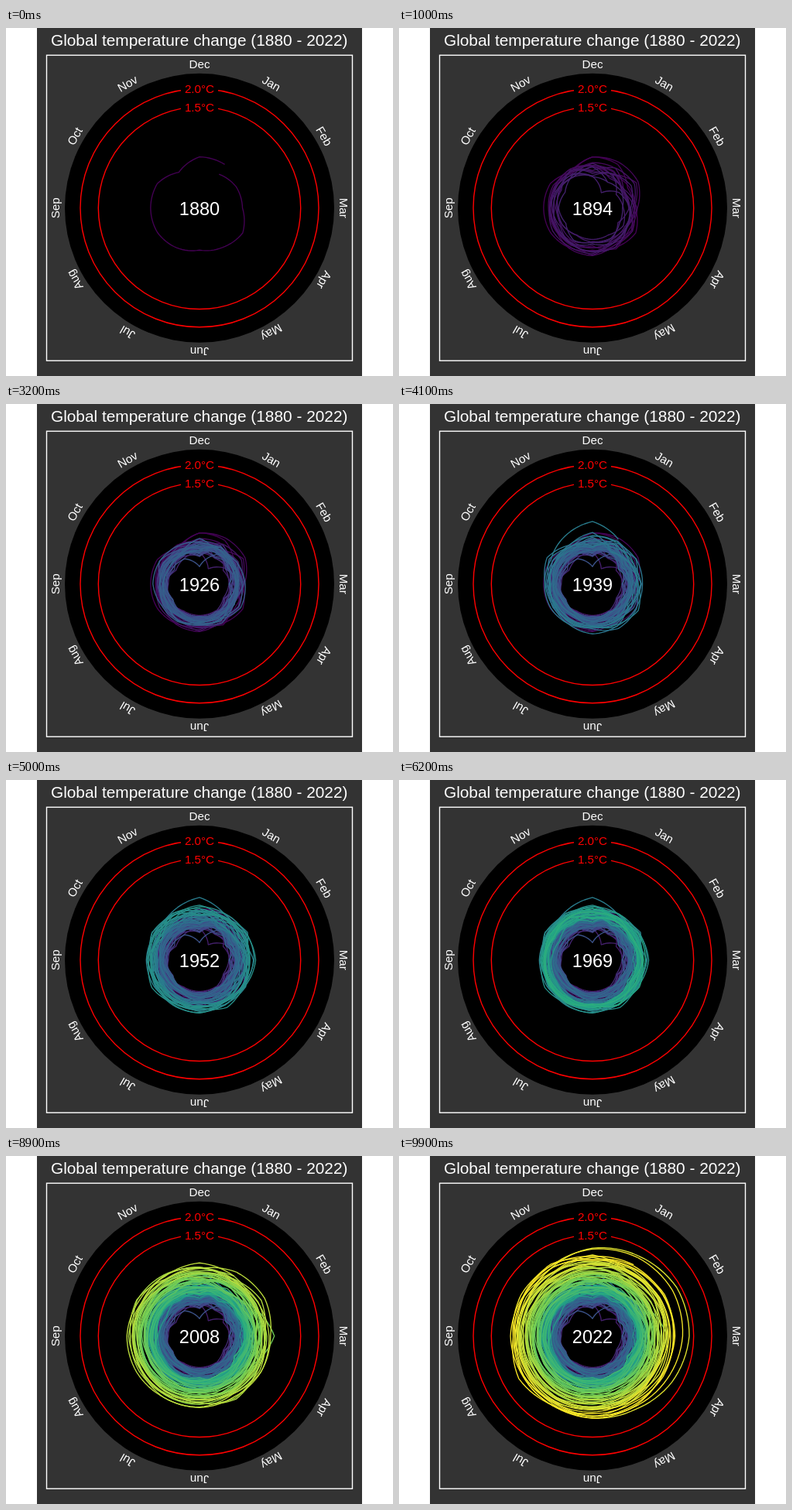
An HTML page for the animation above (10000 ms loop, 500x450 px).

```html
<!DOCTYPE html>
<html lang="en">
<head>
<meta charset="utf-8">
<title>Global temperature change</title>
<style>
  html, body { margin: 0; width: 100%; height: 100%; overflow: hidden; background: #fff; }
  svg { display: block; width: 500px; height: 450px; }
  text { font-family: "Liberation Sans", Arial, sans-serif; text-anchor: middle; fill: #fff; }
</style>
</head>
<body>
<svg id="stage" viewBox="0 0 500 450"></svg>
<script>
const CX = 250, CY = 232.8;
const FIRST = 1880, LAST = 2022;
const STEP = 100, STEPS = 100;
const MONTHS = ["Jan", "Feb", "Mar", "Apr", "May", "Jun", "Jul", "Aug", "Sep", "Oct", "Nov", "Dec"];
const VIRIDIS = ["440154", "414487", "2a788e", "22a884", "7ad151", "fde725"];

// Long-term anomaly in degrees, one key point every 13 years
const TREND = [-0.15, -0.27, -0.36, -0.28, -0.16, 0.08, -0.02, 0, 0.22, 0.45, 0.66, 0.94];

// Outstanding warm and cold spells; width in months
const SPELLS = [
  { year: 1882, month: 0, level: 0.16, width: 1.2 },
  { year: 1893, month: 0, level: -0.82, width: 0.6 },
  { year: 1916, month: 11, level: -0.82, width: 0.6 },
  { year: 1939, month: 11, level: 0.43, width: 0.8 },
  { year: 1990, month: 2, level: 0.77, width: 0.7 },
  { year: 2016, month: 1.4, level: 1.4, width: 2 },
  { year: 2020, month: 1, level: 1.25, width: 2 }
];

const stage = document.getElementById("stage");

function add(tag, attrs, text) {
  const node = document.createElementNS("http://www.w3.org/2000/svg", tag);
  for (const key in attrs) node.setAttribute(key, attrs[key]);
  if (text) node.textContent = text;
  return stage.appendChild(node);
}

function makeRandom(seed) {
  return () => {
    seed = (Math.imul(seed, 1664525) + 1013904223) >>> 0;
    return seed / 4294967296;
  };
}

const radius = degrees => 60.8 + 46.6 * degrees;

function lerpAt(list, position) {
  const i = Math.min(Math.floor(position), list.length - 2);
  return list[i] + (list[i + 1] - list[i]) * (position - i);
}

function yearColor(year) {
  const position = (year - FIRST) / (LAST - FIRST) * (VIRIDIS.length - 1);
  const channels = [0, 2, 4].map(k =>
    Math.round(lerpAt(VIRIDIS.map(hex => parseInt(hex.slice(k, k + 2), 16)), position)));
  return `rgb(${channels})`;
}

// Monthly anomalies: trend, yearly and monthly noise (calmer in summer
// and in later years), pulled towards the level of any spell nearby
function makeAnomalies() {
  const random = makeRandom(1880);
  const noise = () => random() + random() - 1;
  const count = (LAST - FIRST + 2) * 12;
  const values = [];
  let yearly = 0;
  for (let i = 0; i < count; i++) {
    const month = i % 12;
    const calm = 1.1 - 0.45 * i / count;
    if (month === 0) yearly = 0.14 * noise();
    const monthly = (0.2 + 0.06 * Math.cos((month - 0.5) * Math.PI / 6)) * noise();
    let value = lerpAt(TREND, i / 156) + calm * (yearly + monthly);
    for (const { year, month: m, level, width } of SPELLS) {
      const distance = (i - (year - FIRST) * 12 - m) / width;
      value += (level - value) * Math.exp(-distance * distance / 2);
    }
    values.push(value);
  }
  return values;
}

// One year from January to the next January, radius linear in angle
function yearPath(anomalies, start) {
  const points = [];
  for (let k = 0; k <= 96; k++) {
    const month = k / 8;
    const r = radius(lerpAt(anomalies, start + month));
    const angle = (month + 1) * Math.PI / 6;
    points.push((CX + r * Math.sin(angle)).toFixed(2) + " " + (CY - r * Math.cos(angle)).toFixed(2));
  }
  return "M" + points.join("L");
}

add("rect", { x: 40, y: 0, width: 420, height: 450, fill: "#333" });
add("rect", { x: 52.5, y: 35.2, width: 395, height: 395, fill: "none", stroke: "#fff", "stroke-width": 1.4 });
add("text", { x: 249.7, y: 23, "font-size": 20.85 }, "Global temperature change (1880 - 2022)");
add("circle", { cx: CX, cy: CY, r: 174, fill: "#000" });

MONTHS.forEach((name, i) => add("text", {
  x: CX, y: CY - 180.6, "font-size": 15.2, transform: `rotate(${(i + 1) * 30} ${CX} ${CY})`
}, name));

for (const limit of [1.5, 2]) {
  const r = radius(limit);
  add("circle", { cx: CX, cy: CY, r, fill: "none", stroke: "#f00", "stroke-width": 1.4 });
  add("rect", { x: 226, y: CY - r - 9, width: 48, height: 20, fill: "#000" });
  add("text", { x: CX, y: CY - r + 5.4, "font-size": 15.2, style: "fill:#f00" }, limit.toFixed(1) + "°C");
}

const anomalies = makeAnomalies();
const lines = [];
for (let year = FIRST; year <= LAST; year++) {
  lines.push(add("path", {
    d: yearPath(anomalies, (year - FIRST) * 12),
    fill: "none", stroke: yearColor(year), "stroke-width": 1.35, "stroke-linejoin": "round"
  }));
}
const label = add("text", { x: CX, y: 242, "font-size": 23.5 });

let shown = -1;
function render(time) {
  const step = Math.floor(time / STEP) % STEPS;
  const count = Math.round(step * (LAST - FIRST) / (STEPS - 1));
  if (count === shown) return;
  shown = count;
  lines.forEach((line, i) => line.setAttribute("display", i <= count ? "inline" : "none"));
  label.textContent = FIRST + count;
}

const begin = performance.now();
function tick() {
  render(performance.now() - begin);
  requestAnimationFrame(tick);
}
tick();
</script>
</body>
</html>
```
